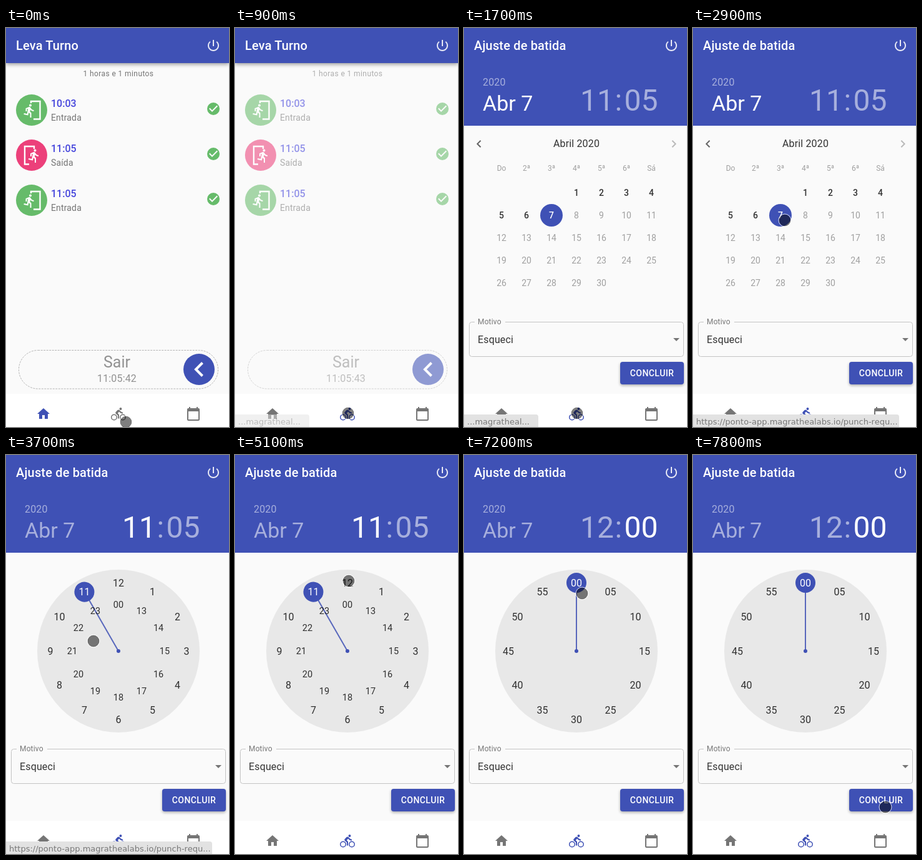
Animation, 357 px wide and 637 px high, one loop 8 s. Source, as an HTML page:

```html
<!DOCTYPE html>
<html lang="pt">
<head>
<meta charset="utf-8">
<title>Ajuste de batida</title>
<style>
html, body { margin: 0; width: 100%; height: 100%; overflow: hidden; background: #fafafa; }
svg { display: block; width: 100%; height: 100%; font-family: Roboto, sans-serif; filter: blur(.45px); }
.mid { text-anchor: middle; }
.lift { filter: drop-shadow(0 2px 2px rgba(0,0,0,.3)); }
.bar { filter: drop-shadow(0 2px 3px rgba(0,0,0,.4)); }
</style>
</head>
<body>
<svg id="stage" viewBox="0 0 357 637"></svg>
<script>
const LOOP = 8000, STEP = 100;
const BLUE = '#3f51b5', GREEN = '#66bb6a', PINK = '#ec407a', GRAY = '#757575';
const INK = 'rgba(0,0,0,.8)', FAINT = 'rgba(0,0,0,.36)', DIM = 'rgba(255,255,255,.54)';

const ICONS = {
  power: 'M13 3h-2v10h2V3zm4.83 2.17l-1.42 1.42C17.99 7.86 19 9.81 19 12c0 3.87-3.13 7-7 7s-7-3.13-7-7c0-2.19 1.01-4.14 2.58-5.42L6.17 5.17C4.23 6.82 3 9.26 3 12c0 4.97 4.03 9 9 9s9-4.03 9-9c0-2.74-1.23-5.18-3.17-6.83z',
  home: 'M10 20v-6h4v6h5v-8h3L12 3 2 12h3v8z',
  bike: 'M15.5 5.5a2 2 0 1 0 0-4 2 2 0 0 0 0 4zM5 12a5 5 0 1 0 0 10 5 5 0 0 0 0-10zm0 8.5a3.5 3.5 0 1 1 0-7 3.5 3.5 0 0 1 0 7zm5.8-10l2.4-2.4.8.8c1.3 1.3 3 2.1 5.1 2.1V9c-1.5 0-2.7-.6-3.6-1.5l-1.9-1.9c-.5-.4-1-.6-1.6-.6s-1.1.2-1.4.6L7.8 8.4c-.4.4-.6.9-.6 1.4 0 .6.2 1.1.6 1.4L11 14v5h2v-6.2l-2.2-2.3zM19 12a5 5 0 1 0 0 10 5 5 0 0 0 0-10zm0 8.5a3.5 3.5 0 1 1 0-7 3.5 3.5 0 0 1 0 7z',
  date: 'M20 3h-1V1h-2v2H7V1H5v2H4c-1.1 0-2 .9-2 2v16c0 1.1.9 2 2 2h16c1.1 0 2-.9 2-2V5c0-1.1-.9-2-2-2zm0 18H4V8h16v13z',
  run: 'M13.5 5.5a2 2 0 1 0 0-4 2 2 0 0 0 0 4zM9.9 19.4l1-4.4 2.1 2v6h2v-7.5l-2.1-2 .6-3c1.3 1.5 3.3 2.5 5.5 2.5v-2c-1.9 0-3.5-1-4.3-2.4l-1-1.6c-.4-.6-1-1-1.7-1-.3 0-.5.1-.8.1L6 8.3V13h2V9.6l1.8-.7-1.6 8.1-4.9-1-.4 2z',
  check: 'M12 2a10 10 0 1 0 0 20 10 10 0 0 0 0-20zm-2 15l-5-5 1.41-1.41L10 14.17l7.59-7.59L19 8z',
  left: 'M15.41 7.41L14 6l-6 6 6 6 1.41-1.41L10.83 12z',
  right: 'M10 6L8.59 7.41 13.17 12l-4.58 4.59L10 18l6-6z',
  down: 'M7 10l5 5 5-5z'
};

const icon = (name, x, y, fill, id = '') =>
  `<path id="${id}" d="${ICONS[name]}" transform="translate(${x} ${y})" fill="${fill}"/>`;
const text = (s, x, y, size, fill, extra = '') =>
  `<text x="${x}" y="${y}" font-size="${size}" fill="${fill}" ${extra}>${s}</text>`;
const circle = (x, y, r, fill, extra = '') =>
  `<circle cx="${x}" cy="${y}" r="${r}" fill="${fill}" ${extra}/>`;
const MID = 'class="mid"', BOLD = 'font-weight="500"', WIDE = 'letter-spacing=".15"';

function punch(time, entering, y) {
  const door = entering ? 'M40 -11V-14H54.5V14.5H44' : 'M45 -10V-14H30V14.5H37';
  return `<g transform="translate(0 ${y})">
    ${circle(41, 0, 25, entering ? GREEN : PINK)}
    <path d="${door}" fill="none" stroke="#fff" stroke-width="2.4"/>
    ${icon('run', entering ? 25.5 : 33, -11, '#fff')}
    ${text(time, 72, -5, 16, '#4646dc', BOLD)}
    ${text(entering ? 'Entrada' : 'Saída', 72, 17, 14, GRAY, WIDE)}
    ${icon('check', 320, -14, GREEN)}</g>`;
}

function homePage() {
  return text('1 horas e 1 minutos', 180, 77, 12, GRAY, MID + ' letter-spacing=".4"') +
    punch('10:03', true, 131) + punch('11:05', false, 203) + punch('11:05', true, 275) +
    `<rect x="20.5" y="514.5" width="319" height="61.5" rx="30.7" fill="none" stroke="#b4b4b4" stroke-dasharray="3 1.5"/>` +
    text('Sair', 177.5, 542, 25, '#919191', MID) +
    text('', 177.5, 564.5, 16, '#919191', MID + ' ' + WIDE + ' id="now"') +
    circle(309, 545, 25, BLUE) +
    '<path d="M314.5 534.5L304 545L314.5 555.5" fill="none" stroke="#fff" stroke-width="4"/>';
}

function calendar() {
  let out = icon('left', 12, 173, 'rgba(0,0,0,.6)') + icon('right', 324, 173, 'rgba(0,0,0,.26)') +
    text('Abril 2020', 180, 190, 16, INK, MID + ' ' + WIDE) + circle(140, 299, 18, BLUE);
  ['Do', '2ª', '3ª', '4ª', '5ª', '6ª', 'Sá'].forEach((d, i) => {
    out += text(d, 60 + 40 * i, 228, 12, FAINT, MID);
  });
  for (let d = 1; d <= 30; d++) {
    const cell = d + 2;
    out += text(d, 60 + 40 * (cell % 7), 268 + 36 * Math.floor(cell / 7), 14,
      d === 7 ? '#fff' : d < 7 ? INK : FAINT, MID + (d <= 7 ? ' ' + BOLD : ''));
  }
  return out;
}

const pad = n => String(n).padStart(2, '0');
function ring(radius, size, label) {
  let out = '';
  for (let i = 1; i <= 12; i++) {
    const a = i * Math.PI / 6, s = label(i);
    out += text(s, 180 + radius * Math.sin(a), 313 - radius * Math.cos(a) + size * .355,
      size, INK, `${MID} data-n="${s}"`);
  }
  return out;
}

function clock() {
  return circle(180, 313, 130, '#e8e8e8') +
    `<g id="hand">
      <path d="M180 313V204" stroke="${BLUE}" stroke-width="2" opacity=".85"/>
      ${circle(180, 204, 16, BLUE)}</g>` +
    circle(180, 313, 3, BLUE) +
    `<g id="hours">${ring(109, 16, i => i)}${ring(74, 14.5, i => pad((i + 12) % 24))}</g>` +
    `<g id="minutes">${ring(109, 16, i => pad(i * 5 % 60))}</g>`;
}

function adjustPage() {
  return `<rect y="56" width="357" height="100" fill="${BLUE}"/>` +
    text('2020', 30, 92, 16, DIM, WIDE) +
    text('Abr 7', 30, 132, 34, '#fff', 'id="day"') +
    text('11', 240, 132, 48, DIM, 'id="hh" text-anchor="end"') +
    text(':', 241.5, 132, 48, DIM) +
    text('05', 256.5, 132, 48, DIM, 'id="mm"') +
    `<g id="calendar">${calendar()}</g><g id="clock">${clock()}</g>` +
    `<path d="M17 469.5H12.5a4 4 0 0 0-4 4V520.5a4 4 0 0 0 4 4H347.5a4 4 0 0 0 4-4V473.5a4 4 0 0 0-4-4H66" fill="none" stroke="#c4c4c4"/>` +
    text('Motivo', 22, 473, 12, GRAY, WIDE) +
    text('Esqueci', 22, 503, 16, INK, WIDE) +
    icon('down', 328, 485, GRAY) +
    `<rect class="lift" x="250" y="533" width="102" height="36" rx="4" fill="${BLUE}"/>` +
    text('CONCLUIR', 301, 556, 14, '#fff', `${MID} ${BOLD} letter-spacing=".4"`);
}

document.getElementById('stage').innerHTML =
  `<rect width="357" height="637" fill="#fafafa"/>
  <rect class="bar" width="357" height="56" fill="${BLUE}"/>
  ${text('', 16, 35, 20, '#fff', `${BOLD} ${WIDE} id="title"`)}
  ${icon('power', 320, 16, '#e8eaf6')}
  <g id="home">${homePage()}</g>
  <g id="adjust">${adjustPage()}</g>
  <rect y="584" width="357" height="53" fill="#fff"/>
  ${icon('home', 48, 604, GRAY, 'tabHome')}
  ${icon('bike', 168, 604.5, GRAY, 'tabBike')}
  ${icon('date', 288, 604, GRAY)}
  <g id="tip">
    <path id="tipBox" fill="#e2e2e2"/>
    ${text('', 5, 633, 13, '#777', 'id="tipText" style="font-family:\'DejaVu Sans\',sans-serif"')}
  </g>
  <g id="cursor">
    ${circle(0, 0, 9, 'rgba(0,0,0,.5)', 'stroke="rgba(0,0,0,.35)"')}
    ${circle(0, 0, 10, 'none', 'stroke="rgba(255,255,255,.75)"')}
  </g>`;

const ui = {};
document.querySelectorAll('[id]').forEach(el => { if (el.id) ui[el.id] = el; });

const clamp = v => Math.max(0, Math.min(1, v));
const ease = v => { const k = clamp(v); return k * k * (3 - 2 * k); };
const show = (el, on) => el.setAttribute('display', on ? 'inline' : 'none');
const fill = (el, color) => el.setAttribute('fill', color);
const write = (el, s) => { if (el.textContent !== s) el.textContent = s; };

// Pointer rests: time, x, y
const RESTS = [
  [0, 192, 629], [200, 185, 620], [300, 181, 615],
  [2900, 147, 307], [3000, 144, 302], [3100, 142, 299], [3400, 141, 298], [3500, 140, 297],
  [4100, 139, 285], [4200, 138, 266], [4300, 137, 250], [4400, 136, 238], [4500, 134, 245],
  [4700, 183, 202], [4900, 187, 201], [5100, 182, 201]
];

function pointer(t) {
  const [, x, y] = RESTS.filter(r => r[0] <= t).pop();
  const k = ease((t - 7100) / 700);
  return [x + (308 - x) * k, y + (562 - y) * k];
}

function handAngle(t) {
  if (t < 5500) return 330;
  return t < 6700 ? 360 - 330 * ease((t - 5420) / 380) : 0;
}

function drawTip(t) {
  const full = t >= 2400, w = !full ? 119 : t < 2900 ? 357 : 330;
  ui.tip.setAttribute('opacity', Math.min(clamp((t - 800) / 200), clamp((4400 - t) / 300)));
  ui.tipBox.setAttribute('d', `M0 617H${w - 4}a4 4 0 0 1 4 4V637H0z`);
  write(ui.tipText, full ? 'https://ponto-app.magrathealabs.io/punch-requ...' : '...magratheal...');
}

function draw(t) {
  const adjusting = t >= 1500, timing = t >= 3700, onMinutes = t >= 5500, done = t >= 6700;
  write(ui.title, adjusting ? 'Ajuste de batida' : 'Leva Turno');
  write(ui.now, t < 500 ? '11:05:42' : '11:05:43');
  ui.home.setAttribute('opacity', clamp(1 - (t - 600) / 700));
  ui.adjust.setAttribute('opacity', clamp((t - 1400) / 250));
  fill(ui.tabHome, t < 700 ? BLUE : GRAY);
  fill(ui.tabBike, t < 700 ? GRAY : BLUE);

  write(ui.hh, onMinutes ? '12' : '11');
  write(ui.mm, done ? '00' : '05');
  fill(ui.day, timing ? DIM : '#fff');
  fill(ui.hh, timing && !onMinutes ? '#fff' : DIM);
  fill(ui.mm, onMinutes ? '#fff' : DIM);

  show(ui.calendar, !timing);
  show(ui.clock, timing);
  show(ui.hours, !onMinutes);
  show(ui.minutes, onMinutes);
  ui.hand.setAttribute('transform', `rotate(${handAngle(t)} 180 313)`);
  const picked = !onMinutes ? '11' : done ? '00' : '05';
  for (const el of (onMinutes ? ui.minutes : ui.hours).children) {
    fill(el, el.dataset.n === picked ? '#fff' : INK);
  }

  drawTip(t);
  ui.cursor.setAttribute('transform', `translate(${pointer(t)})`);
}

const start = performance.now();
function tick() {
  const t = (performance.now() - start) % LOOP;
  draw(Math.floor(t / STEP) * STEP);
  requestAnimationFrame(tick);
}
tick();
</script>
</body>
</html>
```
